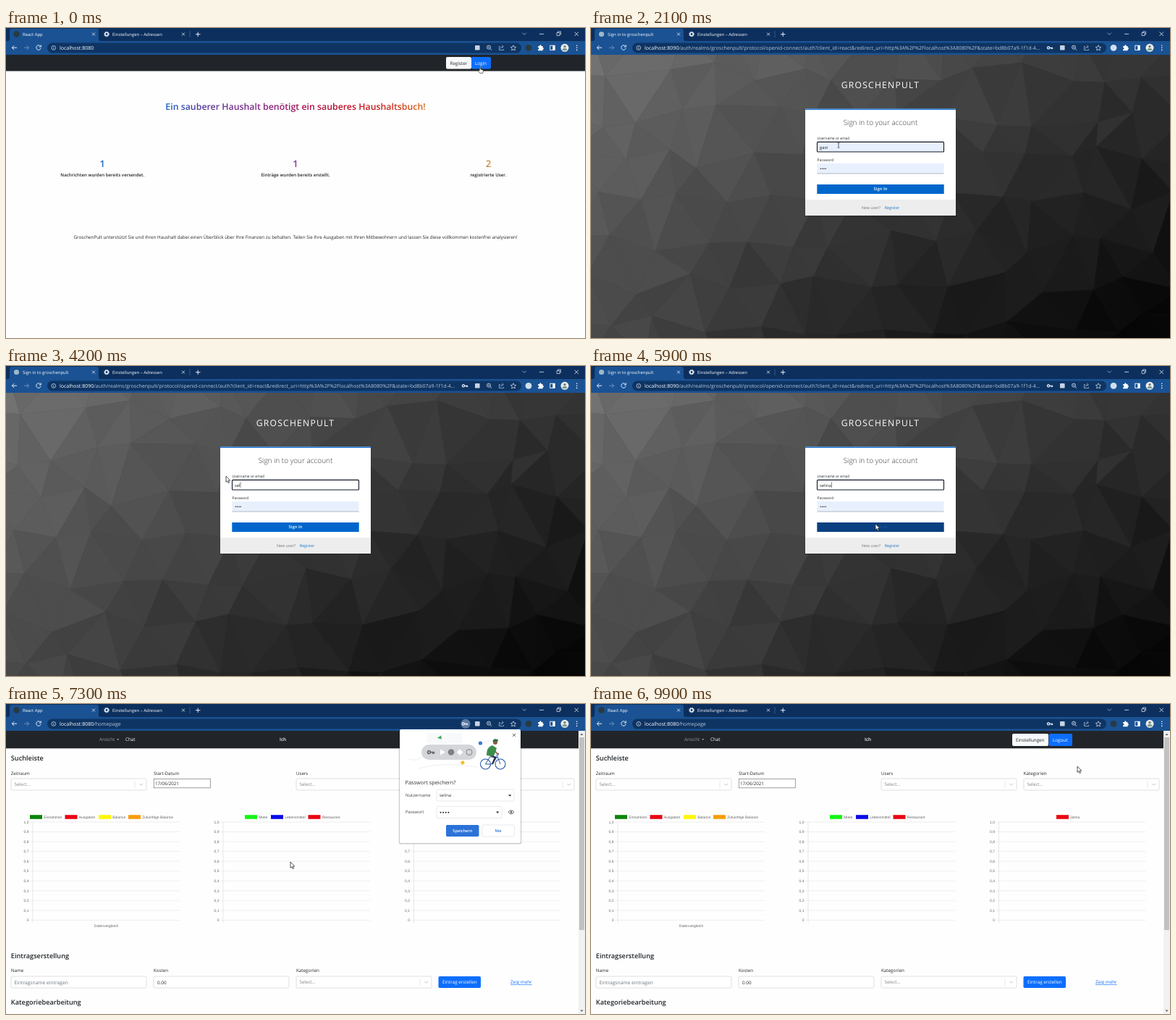
An HTML page for the animation above (10000 ms loop, 800 by 428 pixels).

```html
<!DOCTYPE html>
<html lang="de">
<head>
<meta charset="utf-8">
<title>GroschenPult</title>
<style>
html, body { margin: 0; width: 100%; height: 100%; overflow: hidden; background: #fefefe; }
svg { display: block; width: 800px; height: 428px; }
text { font-family: "Open Sans", "Noto Sans", sans-serif; white-space: pre; text-rendering: geometricPrecision; }
.arial text { font-family: "Liberation Sans", Arial, sans-serif; }
</style>
</head>
<body>
<svg id="stage" viewBox="0 0 800 428" xmlns="http://www.w3.org/2000/svg"></svg>
<script>
const LOOP = 10000, STEP = 100;
const APP = 'GroschenPult', OLD_USER = 'gast', USER = 'selina';
const DARK = '#212529', BLUE = '#0d6efd';

// Markup helpers
const text = (x, y, size, str, fill = DARK, more = '') =>
  `<text x="${x}" y="${y}" font-size="${size}" fill="${fill}" ${more}>${str}</text>`;
const rect = (x, y, w, h, fill, more = '') =>
  `<rect x="${x}" y="${y}" width="${w}" height="${h}" fill="${fill}" ${more}/>`;
const circle = (x, y, r, fill, more = '') =>
  `<circle cx="${x}" cy="${y}" r="${r}" fill="${fill}" ${more}/>`;
const line = (d, color, width = 0.8, more = '') =>
  `<path d="${d}" fill="none" stroke="${color}" stroke-width="${width}" ${more}/>`;
const group = (id, body, more = '') => `<g id="${id}" ${more}>${body}</g>`;
const MID = 'text-anchor="middle"', BOLD = 'font-weight="600"';
const gradient = (id, x1, x2, ...colors) =>
  `<linearGradient id="${id}" gradientUnits="userSpaceOnUse" x1="${x1}" x2="${x2}" y1="0" y2="0">` +
  colors.map((c, i) => `<stop offset="${i / (colors.length - 1)}" stop-color="${c}"/>`).join('') +
  '</linearGradient>';

const defs = '<defs>' +
  gradient('title', 219, 581, '#1666c8', '#5a3aa0', '#75308f', '#8c1f78', '#b01045', '#c41224', '#cf2a1e', '#d8701f') +
  gradient('first', 130, 136, '#1550a8', '#1c62bd', '#35a5d8') +
  gradient('second', 397, 402.5, '#3c3fae', '#7a3098', '#c04c9a') +
  gradient('third', 662, 671, '#b8703c', '#cf8a3c', '#d69a55') +
  '<clipPath id="tabClip"><rect x="0" y="0" width="113" height="18"/></clipPath></defs>';

function landing() {
  const stat = (x, n, fill, label) =>
    text(x, 192, 13, n, `url(#${fill})`, `${MID} ${BOLD}`) +
    text(x, 205, 6.15, label, DARK, `${MID} ${BOLD}`);
  return rect(0, 37, 800, 391, '#fefefe') + rect(0, 37, 800, 22.5, DARK) +
    rect(608, 40, 35, 16.5, '#f8f9fa', 'rx="2"') + text(613.5, 51, 6.3, 'Register') +
    rect(643, 40, 27, 16.5, BLUE, 'rx="2" id="loginBtn"') + text(648, 51, 6.3, 'Login', '#fff') +
    text(400, 112.5, 12.35, 'Ein sauberer Haushalt benötigt ein sauberes Haushaltsbuch!', 'url(#title)', `${MID} ${BOLD}`) +
    stat(133.3, 1, 'first', 'Nachrichten wurden bereits versendet.') +
    stat(400, 1, 'second', 'Einträge wurden bereits erstellt.') +
    stat(666.6, 2, 'third', 'registrierte User.') +
    text(400, 290.5, 6.29, APP + ' unterstützt Sie und Ihren Haushalt dabei einen Überblick über Ihre Finanzen zu behalten. ' +
      'Teilen Sie Ihre Ausgaben mit Ihren Mitbewohnern und lassen Sie diese vollkommen kostenfrei analysieren!', DARK, MID);
}

// Low-poly backdrop: staggered, jittered grid, lit from the top left
function backdrop() {
  let seed = 11;
  const rnd = () => (seed = (seed * 16807) % 2147483647) / 2147483647;
  const clamp = v => Math.min(1, Math.max(0, v));
  const cols = 15, rows = 8, pts = [];
  for (let r = 0; r <= rows; r++)
    for (let c = 0; c <= cols; c++)
      pts.push([-60 + (c + (r % 2) / 2) * 62 + (rnd() - 0.5) * 34, 5 + r * 58 + (rnd() - 0.5) * 32]);
  const tri = (...ids) => {
    const p = ids.map(i => pts[i]);
    const u = clamp((p[0][0] + p[1][0] + p[2][0]) / 2400);
    const v = clamp(((p[0][1] + p[1][1] + p[2][1]) / 3 - 37) / 391);
    const base = (1 - v) * (110 - 60 * u) + v * (76 - 74 * u) - 30 * v * u * (1 - u);
    const k = Math.max(1, Math.round(base + (rnd() - 0.5) * 10));
    const color = `rgb(${k},${k},${k})`;
    return `<polygon points="${p.join(' ')}" fill="${color}" stroke="${color}" stroke-width=".5"/>`;
  };
  let out = rect(0, 37, 800, 391, '#333');
  for (let r = 0; r < rows; r++)
    for (let c = 0; c < cols; c++) {
      const a = r * (cols + 1) + c, b = a + 1, d = a + cols + 1, e = d + 1;
      out += r % 2 ? tri(a, b, e) + tri(a, e, d) : tri(a, b, d) + tri(b, e, d);
    }
  return out;
}

const dots = (x, y, gap, r) => [0, 1, 2, 3].map(i => circle(x + i * gap, y, r, '#222')).join('');

function login() {
  return backdrop() +
    text(400, 82.8, 12.08, APP.toUpperCase(), '#fff', `${MID} letter-spacing="1.25"`) +
    rect(295.5, 113, 209, 147.5, '#000', 'opacity=".15"') +
    rect(296, 111.5, 208, 147.3, '#fff') + rect(296, 111.5, 208, 1.5, '#1a75d1') +
    rect(296, 237, 208, 21.8, '#ededed') +
    text(400, 134, 10, 'Sign in to your account', '#363636', `${MID} font-weight="300"`) +
    text(312.5, 154.2, 5, 'Username or email') +
    rect(312.5, 157.4, 175, 13.6, '#e8f0fe', 'id="userBox"') +
    rect(315.5, 159.5, 13, 9, '#3485e8', 'id="selection"') +
    text(316, 166.6, 5.83, '', '#222', 'id="userText"') +
    rect(325, 160.3, 0.5, 7.6, '#111', 'id="caret"') +
    text(312.5, 183.8, 5, 'Password') +
    rect(312.5, 187, 175, 14, '#e8f0fe') + line('M312.5 201h175', '#8a8d90', 0.6) +
    dots(317.3, 194.2, 2.3, 0.75) +
    rect(312.3, 216, 175.4, 13, '#06c', 'id="signIn"') +
    text(400, 224.3, 5.83, 'Sign In', '#fff', `${MID} ${BOLD} id="signText"`) +
    text(374, 249.8, 5.42, 'New user?', '#72767b') + text(405.7, 249.8, 5.42, 'Register', '#1f76c8');
}

function chart(x, legend) {
  let out = '';
  for (let i = 0; i <= 10; i++) {
    const y = 163 + i * 13.55;
    const label = i === 10 ? '0' : ((10 - i) / 10).toFixed(1).replace('.', ',');
    out += line(`M${x - 4} ${y}H${x + 203}`, '#dedede', 0.5) + text(x - 5.5, y + 1.7, 5, label, '#666', 'text-anchor="end"');
  }
  out += line(`M${x} 163V302`, '#d2d2d2', 0.5);
  for (const [lx, color, label] of legend)
    out += rect(lx, 153.2, 17, 5.6, color) + text(lx + 19.2, 157.8, 5, label, '#666');
  return out;
}

function home() {
  const field = (x, y, w = 187) => rect(x, y, w, 16, '#fff', 'rx="1.7" stroke="#ccc" stroke-width=".6"');
  const select = (x, y) => field(x, y) + text(x + 4.5, y + 10.4, 6.2, 'Select...', '#808080') +
    line(`M${x + 171} ${y + 3.3}v9.5`, '#ccc', 0.5) + line(`M${x + 177.5} ${y + 7}l2.2 2.2 2.2-2.2`, '#bbb', 0.9);
  const heading = (y, str) => text(6.8, y, 9.2, str, DARK, BOLD);
  return rect(0, 37, 800, 391, '#fefefe') + rect(0, 37, 791, 24.3, DARK) +
    text(129, 51.3, 6.2, 'Ansicht', '#9a9c9e') + '<path d="M153 48h3.4l-1.7 1.9z" fill="#9a9c9e"/>' +
    text(165, 51.3, 6.3, 'Chat', '#fff') + text(378, 51.3, 6.3, 'Ich', '#fff', BOLD) +
    rect(582, 41, 50, 17, '#f8f9fa', 'rx="2"') + text(587, 51.8, 6.3, 'Einstellungen') +
    rect(632.5, 41, 32.5, 17, BLUE, 'rx="2"') + text(638, 51.8, 6.3, 'Logout', '#fff') +
    heading(78, 'Suchleiste') +
    text(6.8, 97.5, 6.15, 'Zeitraum') + text(204, 97.5, 6.15, 'Start-Datum') +
    text(401, 97.5, 6.15, 'Users') + text(597.7, 97.5, 6.3, 'Kategorien') +
    select(7, 103) + select(401, 103) + select(598, 103) +
    rect(204.3, 103.3, 78, 12.5, '#fff', 'stroke="#767676" stroke-width=".7"') + text(206, 111.7, 6.2, '17/06/2021') +
    group('charts',
      chart(37, [[33, '#0a850a', 'Einnahmen'], [81.5, '#e80612', 'Ausgaben'], [128, '#fff70a', 'Balance'], [169, '#fa9d0a', 'Zukünftige Balance']]) +
      chart(300, [[330, '#14f514', 'Miete'], [366, '#0a0ae8', 'Lebensmittel'], [417.5, '#e80612', 'Restaurant']]) +
      chart(563.5, [[643, '#e80612', USER]]) +
      text(138.5, 307.8, 5, 'Datenvergleich', '#666', MID), 'class="arial"') +
    heading(351, 'Eintragserstellung') +
    text(6.8, 370.3, 6.2, 'Name') + text(204, 370.3, 6.2, 'Kosten') + text(401, 370.3, 6.3, 'Kategorien') +
    field(7, 376) + text(11.5, 386.6, 6.7, 'Eintragsname eintragen', '#6c757d') +
    field(204, 376) + text(209, 386.5, 6.3, '0.00') + select(401, 376) +
    rect(597.5, 376, 58.5, 16, BLUE, 'rx="1.7"') + text(603, 386.4, 6.3, 'Eintrag erstellen', '#fff') +
    text(697, 386.4, 6.3, 'Zeig mehr', BLUE, 'text-decoration="underline"') +
    heading(415.3, 'Kategoriebearbeitung') +
    rect(791, 37, 9, 391, '#f1f1f1') + rect(792, 46, 7, 266, '#c1c1c1') +
    '<path d="M793.5 43l2-2.5 2 2.5zM793.5 422.5l2 2.5 2-2.5z" fill="#606060"/>';
}

const key = (x, y, color, s = 1) =>
  `<g transform="translate(${x} ${y}) scale(${s})">` + circle(-2, 0, 1.6, 'none', `stroke="${color}" stroke-width="1.3"`) +
  line('M-.4 0H4M2 0v2M3.6 0v1.7', color, 1.2) + '</g>';

function browser() {
  const W = '#e8eff8';
  return rect(0, 0, 800, 18, '#0c2f5d') + rect(0, 18, 800, 19, '#1a5293') +
    '<path d="M2 18q3 0 3-3V4q0-3 3-3H125q3 0 3 3v11q0 3 3 3z" fill="#1a5293"/>' +
    circle(14.5, 8.5, 4.4, '#273b45', 'id="reactIcon"') + circle(14.5, 8.5, 3.6, '#9fb8c6', 'id="loginIcon"') +
    line('M14.5 5.2a3.3 3.3 0 0 1 3.3 3.3', '#7fb0e6', 0.8, 'id="spinner"') +
    text(23, 10.8, 5.93, '', '#fff', 'id="tab" clip-path="url(#tabClip)"') +
    line('M119 6.5l4 4m0-4l-4 4', W) +
    circle(139, 8.5, 2.2, 'none', `stroke="${W}" stroke-width="1.6"`) +
    circle(139, 8.5, 3.4, 'none', `stroke="${W}" stroke-width="1" stroke-dasharray="1.3 1.37"`) +
    text(147, 10.8, 5.93, 'Einstellungen – Adressen', '#fff') +
    line('M243 6.5l4 4m0-4l-4 4', W) + line('M254 4v9', '#52749f', 0.6) + line('M262 8.7h6.4m-3.2-3.2v6.4', W, 1) +
    line('M713.5 6.6l2.7 2.7 2.7-2.7', '#a9bdd6') + line('M737 8.3h6', W) +
    line('M761 6.5h4v4h-4zM762.5 6.3v-1.4h4v4h-1.3', W, 0.7) + line('M785.5 5.5l5.5 5.5m0-5.5l-5.5 5.5', W) +
    line('M15 27.2H8.3m3-3l-3 3 3 3', W, 1) + line('M25 27.2h6.7m-3-3l3 3-3 3', '#6d92be', 1) +
    group('reload', line('M47.6 25.2a3.2 3.2 0 1 0 .5 2.6M48.3 23.4v2.6h-2.6', W, 1)) +
    line('M42 24.5l5.4 5.4m0-5.4l-5.4 5.4', W, 1, 'id="stop"') +
    rect(57, 20.5, 655, 14, '#0e3463', 'rx="7"') +
    circle(65.8, 27.4, 2.9, 'none', `stroke="${W}" stroke-width=".7"`) + line('M65.8 27v2m0-3.4v.8', W, 0.7) +
    text(74, 29.8, 7, '', '#fff', 'id="url"') +
    circle(635, 27.3, 6.5, '#5d7ba2', 'id="keyGlow"') + group('key', key(0, 27.3, '#dfe8f3')) +
    rect(648, 24, 6.6, 6.6, '#c5d3e4', 'rx=".8" id="translate"') +
    circle(667, 26.6, 2.5, 'none', `stroke="${W}" stroke-width=".8"`) + line('M668.9 28.5l2.2 2.2M665.8 26.6h2.4', W) +
    line('M683 25.5h-1.6v5h6.2v-1.7M683 28.8q.4-3 3.8-3.2m-1.5-1.8l2 1.8-2 1.9', '#b7c8dc', 0.7) +
    '<path d="M701 23.8l1.1 2.4 2.6.3-1.9 1.8.5 2.6-2.3-1.3-2.3 1.3.5-2.6-1.9-1.8 2.6-.3z" fill="none" stroke="#e8eff8" stroke-width=".7"/>' +
    circle(722, 27.3, 4.4, '#273b45', 'id="ext"') +
    '<path d="M735.2 25h2q0-1.8 1.2-1.8T739.6 25h2v2q1.3 0 1.3 1.2t-1.3 1.2v1.9h-6.4v-2q1.4 0 1.4-1.1t-1.4-1.2z" fill="#fff"/>' +
    rect(751.8, 24.2, 6.4, 6.2, 'none', 'stroke="#fff" stroke-width=".9"') + rect(755.3, 24.2, 2.9, 6.2, '#fff') +
    circle(772, 27.3, 5.5, '#e9ecec') + circle(772, 25.6, 1.7, '#6d7e7a') + '<path d="M768.6 31q.4-3.3 3.4-3.3t3.4 3.3z" fill="#7d9b8c"/>' +
    [24.2, 27.3, 30.4].map(y => circle(788.7, y, 0.8, '#fff')).join('');
}

function popup() {
  const box = (y, w) => rect(595, y, w, 16, '#fff', 'rx="1.5" stroke="#d9dbdf" stroke-width=".6"');
  const drop = (x, y) => `<path d="M${x} ${y}h4.4l-2.2 2.4z" fill="#333"/>`;
  const wheel = x => circle(x, 83, 7, 'none', 'stroke="#2457a5" stroke-width="1.1"');
  return rect(542.8, 35, 169.4, 158.6, '#000', 'rx="2.5" opacity=".2"') +
    rect(544, 35, 167, 157, '#fff', 'rx="2"') +
    line('M556 76q12 4 20-4M640 72q8-2 12-12t22-9M571 89q30-10 80-2', '#e1e3e6', 0.6) +
    rect(582, 40, 48, 15, '#f8f9fa') + rect(574, 56, 76, 21, '#d4d6d9', 'rx="10.5"') + key(587, 66.5, '#5f6368', 1.25) +
    '<path d="M600 62.5l7 4-7 4zM627 62.2l4.4 4.4-4.4 4.4-4.4-4.4z" fill="#fff"/>' +
    circle(615, 66.5, 4.3, '#7c8085') + circle(640, 66.5, 4, 'none', 'stroke="#7c8085" stroke-width="1"') +
    '<path d="M596 47l5-3.5 1 5z" fill="#34a853"/>' + circle(655.5, 54, 2.6, '#3b78d8') +
    '<path d="M628 80l4-2 2 4-4 2z" fill="#f3bc25"/>' +
    wheel(662.5) + wheel(683) +
    line('M662.5 83l6-10h10l-7 10zM683 83l-5-13h3', '#2457a5', 1) +
    line('M668 70l8 4-4 9', '#27344d', 2.4) + line('M673 61l5 7 3 1', '#8a5a44', 1.5) +
    '<path d="M664 71q0-12 8-14l6 4-4 11z" fill="#3c8c4c"/>' + circle(676, 53, 3, '#8a5a44') +
    '<path d="M672.4 52q1-4.5 5-3.5t2.3 3z" fill="#2c6f45"/>' +
    line('M700 40.8l4.2 4.2m0-4.2l-4.2 4.2', '#555', 0.9) +
    text(551.5, 111, 7.35, 'Passwort speichern?', '#333') +
    text(552, 128.4, 5.95, 'Nutzername', '#444') + box(118, 107) + text(599, 128.4, 5.95, USER, '#333') + drop(694, 125.3) +
    text(552, 151.2, 5.95, 'Passwort', '#444') + box(141.5, 90) + dots(600.5, 149.8, 3.6, 1) + drop(677, 148.5) +
    '<path d="M694 149.3q4-5 8 0-4 5-8 0z" fill="none" stroke="#555" stroke-width=".9"/>' + circle(698, 149.3, 1.3, '#555') +
    rect(608, 167, 45.5, 16, '#2b73d8', 'rx="1.7"') + text(630.8, 177.1, 5.6, 'Speichern', '#fff', `${MID} ${BOLD}`) +
    rect(658, 167, 44.5, 16, '#fff', 'rx="1.7" stroke="#dadce0" stroke-width=".6" id="never"') +
    text(680, 177.1, 5.6, 'Nie', '#2b73d8', `${MID} ${BOLD}`);
}

const pointers =
  '<path id="arrow" d="M0 0V8.3L1.9 6.6 3.2 9.6 4.6 9 3.3 6.1H5.8Z" fill="#fff" stroke="#111" stroke-width=".7"/>' +
  '<path id="hand" d="M-.7.5q.8-1 1.5 0V4l3 .9q.8.4.6 1.4L3.8 9.3H-.3L-2.6 6q0-1 1-.7l.9.7z" fill="#fff" stroke="#111" stroke-width=".6"/>' +
  '<path id="beam" d="M-1.4-3.4q1.4 0 1.4.7V2.7q0 .7 1.4.7M1.4-3.4Q0-3.4 0-2.7M0 2.7q0 .7-1.4.7" fill="none" stroke="#222" stroke-width=".7"/>';

const stage = document.getElementById('stage');
stage.innerHTML = defs + group('landing', landing()) + group('login', login()) + group('home', home()) +
  browser() + group('popup', popup()) + group('pointer', pointers);

const $ = id => document.getElementById(id);
const show = (id, on) => $(id).setAttribute('display', on ? 'inline' : 'none');
const set = (id, attrs) => { for (const k in attrs) $(id).setAttribute(k, attrs[k]); };
const at = (table, t) => table.filter(row => row[0] <= t).pop();

const PATH = [[0, 655, 53], [300, 655, 53], [1100, 668, 54], [1500, 668, 54], [2000, 342, 162], [2400, 342, 162],
  [3200, 304, 152], [5000, 304, 152], [5800, 393, 218], [7300, 393, 218], [8300, 693, 179], [8900, 693, 179], [9700, 672, 86], [LOOP, 672, 86]];
const POINTER = [[0, 'hand'], [1500, 'arrow'], [1900, 'beam'], [2900, 'arrow']];
const KEYS = [[0, OLD_USER], [3800, 1], [4000, 2], [4200, 3], [4500, 4], [4700, 5], [4900, 6]];
const FADE = [[0, 0], [6700, 0.25], [6800, 0.62], [6900, 0.9], [7000, 1], [8900, 0.5], [9000, 0]];

const dim = s => `<tspan fill="#b9c8da">${s}</tspan>`;
const authUrl = tail => 'localhost:8090' + dim(`/auth/realms/${APP.toLowerCase()}/protocol/openid-connect/auth?client_id=react` +
  `&amp;redirect_uri=http%3A%2F%2Flocalhost%3A8080%2F&amp;state=bd8b07a9-1f1d-4${tail}...`);
const URLS = [[0, 'localhost:8080'], [1200, authUrl('b7f-8')], [1600, authUrl('')], [6600, 'localhost:8080'], [7200, 'localhost:8080' + dim('/homepage')]];
const TABS = [[0, 'React App'], [1200, `localhost:8090/auth/realms/${APP.toLowerCase()}`], [1600, 'Sign in to ' + APP.toLowerCase()], [6600, 'React App']];

function place(t) {
  const i = PATH.findIndex(p => p[0] > t), a = PATH[i - 1], b = PATH[i];
  const k = (t - a[0]) / (b[0] - a[0]), e = k * k * (3 - 2 * k);
  return [a[1] + (b[1] - a[1]) * e, a[2] + (b[2] - a[2]) * e];
}

function draw(t) {
  const first = t >= 1200 && t < 1600, loading = first || (t >= 6200 && t < 6600);
  const react = t < 1200 || t >= 6600;
  show('landing', t < 1600);
  show('login', t >= 1600 && t < 7200);
  show('home', t >= 7200);

  // Browser frame
  show('reactIcon', react);
  show('loginIcon', !react && !loading);
  show('spinner', loading);
  set('spinner', { transform: `rotate(${t * 0.36} 14.5 8.5)` });
  show('reload', !loading);
  show('stop', loading);
  $('tab').textContent = at(TABS, t)[1];
  $('url').innerHTML = at(URLS, t)[1];
  show('key', t >= 1200);
  set('key', { transform: `translate(${first ? 651 : 634} 0)` });
  show('keyGlow', t >= 6700 && t < 8900);
  show('translate', !first);
  set('ext', { fill: react ? '#273b45' : '#cfe0ee' });

  // Landing button
  set('loginBtn', t >= 800 ? { fill: '#0a58ca', stroke: '#3d70b8', 'stroke-width': 1.4 } : { fill: BLUE, stroke: 'none' });

  // Sign-in form
  const typed = at(KEYS, t)[1], edited = t >= 3800, focus = t < 6100;
  const selected = t >= 2600 && !edited, pressed = t >= 5700;
  $('userText').textContent = edited ? USER.slice(0, typed) : typed;
  set('userText', { fill: selected ? '#fff' : '#222' });
  show('selection', selected);
  show('caret', focus && edited);
  if (t >= 1600 && t < 7200) set('caret', { x: 316.2 + $('userText').getComputedTextLength() });
  set('userBox', { fill: edited ? '#fff' : '#e8f0fe', stroke: focus ? '#101828' : '#c4c6c8', 'stroke-width': focus ? 1.1 : 0.5, rx: focus ? 1 : 0 });
  set('signIn', { fill: pressed ? '#0a4080' : '#06c' });
  set('signText', { fill: pressed ? '#1c5595' : '#fff' });

  // Password bubble
  const alpha = at(FADE, t)[1], scale = 0.96 + 0.04 * alpha;
  show('popup', alpha > 0);
  set('popup', { opacity: alpha, transform: `translate(627.5 113.5) scale(${scale}) translate(-627.5 -113.5)` });
  set('never', { fill: t >= 8700 ? '#e8f0fd' : '#fff' });

  const kind = at(POINTER, t)[1];
  for (const id of ['arrow', 'hand', 'beam']) show(id, id === kind);
  set('pointer', { transform: `translate(${place(t).join(' ')})` });
}

const start = performance.now();
function tick() {
  const t = (performance.now() - start) % LOOP;
  draw(Math.floor(t / STEP) * STEP);
  requestAnimationFrame(tick);
}
tick();
</script>
</body>
</html>
```
